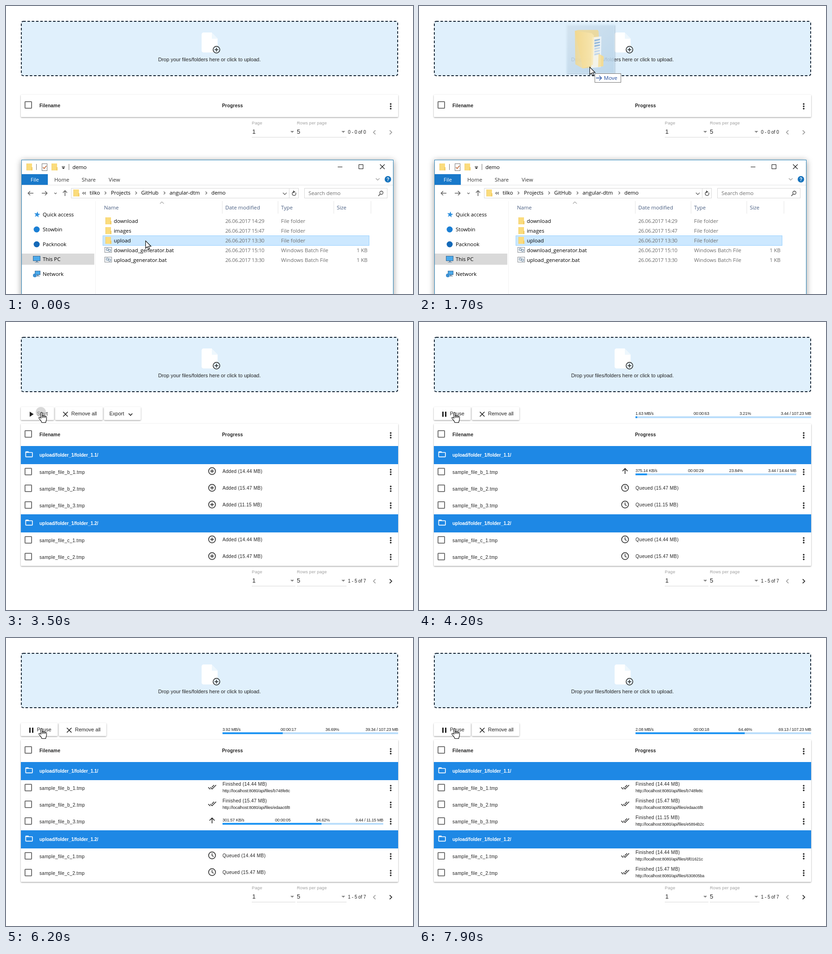
Animation of 876 by 620 pixels, one loop 8 s. Source, as an HTML page with a canvas:

```html
<!DOCTYPE html>
<html lang="en">
<head>
<meta charset="utf-8">
<title>Upload demo</title>
<style>
html, body { margin: 0; width: 100%; height: 100%; overflow: hidden; background: #fff; }
canvas { display: block; }
</style>
</head>
<body>
<canvas id="stage" width="876" height="620"></canvas>
<script>
const c = document.getElementById('stage').getContext('2d');
const LOOP = 8000, STEP = 100, TOTAL = 107.23;
const SANS = '"Liberation Sans", Arial, sans-serif';
const UI = '11.3px "Open Sans", "Noto Sans", sans-serif';
const INK = '#222', BLUE = '#1e88e5';

const FILES = [
  { name: 'sample_file_b_1.tmp', size: 14.44, y: 322, id: 'b748fe8c' },
  { name: 'sample_file_b_2.tmp', size: 15.47, y: 358, id: 'edaac6f8' },
  { name: 'sample_file_b_3.tmp', size: 11.15, y: 394, id: 'e5894b2c' },
  { name: 'sample_file_c_1.tmp', size: 14.44, y: 469, id: '6f01621c' },
  { name: 'sample_file_c_2.tmp', size: 15.47, y: 505, id: '630805ba' }
];
let sum = 0;
for (const f of FILES) { f.start = sum; sum += f.size; }

// [time, value] knots
const ALL_DONE = [[4000, 0], [4900, 15.48], [6200, 39.34], [7900, 69.1252]];
const FILE_DONE = [[4000, 0], [4900, 15.489], [6200, 39.3455], [7900, 70.98]];
const ALL_SPEED = [[4000, 1.4], [4900, 1.85], [6200, 3.92], [7900, 2.08]];
const FILE_SPEED = [[4000, 340], [4900, 392.87], [6200, 301.57], [7900, 410]];

const PAGE = new Path2D('M6 2c-1.1 0-2 .9-2 2v16c0 1.1.9 2 2 2h12c1.1 0 2-.9 2-2V8l-6-6H6z');
const FOLDER = new Path2D('M20 6h-8l-2-2H4c-1.1 0-2 .9-2 2v12c0 1.1.9 2 2 2h16c1.1 0 2-.9 2-2V8c0-1.1-.9-2-2-2zm0 12H4V8h16v10z');
const CHECKS = new Path2D('M18 7l-1.4-1.4-6.35 6.33 1.4 1.4L18 7zm4.24-1.4L11.66 16.17 7.48 12l-1.4 1.4L11.66 19l12-12-1.42-1.4zM.4 13.4L6 19l1.4-1.4L1.83 12 .4 13.4z');
const ARROW = new Path2D('M0 0V16.2L3.7 12.8 6.2 18.6 8.8 17.5 6.3 11.8H11.6Z');
const HAND = new Path2D('M-1.5 1.5C-1.5-.5 1.7-.5 1.7 1.5V8C2 6.6 4.8 6.8 4.8 8.3 5.2 7 7.8 7.3 7.8 9 8.4 8 10.8 8.2 10.8 10V14.5C10.8 18 9 19 9 22H.5C.5 19-2.5 17-5.5 13-6.5 10.5-4 9.8-1.5 12.5Z');
const FINGERS = new Path2D('M1.7 7V11.5M4.8 8V11.5M7.8 9V12');

function at(knots, t, wobble = 0) {
  let i = 1;
  while (i < knots.length - 1 && t > knots[i][0]) i++;
  const [t0, a] = knots[i - 1], [t1, b] = knots[i];
  const u = Math.max(0, Math.min(1, (t - t0) / (t1 - t0)));
  return a + (b - a) * u + wobble * Math.sin(Math.PI * u) * Math.sin(t / 37);
}

function text(s, x, y, font, color = INK, spacing = 0, align = 'left') {
  c.font = font;
  c.fillStyle = color;
  c.letterSpacing = spacing + 'px';
  c.textAlign = align;
  c.fillText(s, x, y);
}
const sans = (s, x, y, px, color, spacing, align) => text(s, x, y, px + 'px ' + SANS, color, spacing, align);
const bold = (s, x, y, color, spacing) => text(s, x, y, 'bold 10px ' + SANS, color, spacing);
const ui = (s, x, y, color = '#000', spacing = 0, align) => text(s, x, y, UI, color, spacing, align);

function box(x, y, w, h, fill, line) {
  if (fill) { c.fillStyle = fill; c.fillRect(x, y, w, h); }
  if (line) { c.strokeStyle = line; c.lineWidth = 1; c.strokeRect(x + .5, y + .5, w - 1, h - 1); }
}

// each run is a flat list of x, y pairs
function lines(color, width, ...runs) {
  c.strokeStyle = color;
  c.lineWidth = width;
  c.beginPath();
  for (const r of runs)
    for (let i = 0; i < r.length; i += 2) c[i ? 'lineTo' : 'moveTo'](r[i], r[i + 1]);
  c.stroke();
}

function poly(fill, ...p) {
  c.fillStyle = fill;
  c.beginPath();
  for (let i = 0; i < p.length; i += 2) c.lineTo(p[i], p[i + 1]);
  c.fill();
}

function disc(x, y, r, fill, line, width = 1.5) {
  c.beginPath();
  c.arc(x, y, r, 0, 7);
  if (fill) { c.fillStyle = fill; c.fill(); }
  if (line) { c.strokeStyle = line; c.lineWidth = width; c.stroke(); }
}

function shape(path, x, y, scale, fill) {
  c.save();
  c.translate(x, y);
  c.scale(scale, scale);
  c.fillStyle = fill;
  c.fill(path);
  c.restore();
}

function raised(x, y, w, h, blur = 3, alpha = .38, dy = 1.3) {
  c.save();
  c.shadowColor = `rgba(0,0,0,${alpha})`;
  c.shadowBlur = blur;
  c.shadowOffsetY = dy;
  c.fillStyle = '#fff';
  c.beginPath();
  c.roundRect(x, y, w, h, 1.5);
  c.fill();
  c.restore();
}

const chevron = (x, y, dx, dy, color, width = 1.5) => dx
  ? lines(color, width, [x - dx, y - dy, x + dx, y, x - dx, y + dy])
  : lines(color, width, [x - 4, y - dy, x, y + dy, x + 4, y - dy]);

function plusIcon(x, y, r, fill) {
  disc(x, y, r, fill, INK);
  lines(INK, 1.5, [x - 4, y, x + 4, y], [x, y - 4, x, y + 4]);
}

function checkbox(y) {
  c.strokeStyle = '#666';
  c.lineWidth = 1.8;
  c.beginPath();
  c.roundRect(40.9, y - 7.1, 14.2, 14.2, 1);
  c.stroke();
}

function dots(y) {
  for (const d of [-5, 0, 5]) disc(828, y + d, 1.8, INK);
}

function dropZone() {
  c.beginPath();
  c.roundRect(33, 33, 810, 117, 4);
  c.fillStyle = '#e0f0fc';
  c.fill();
  c.strokeStyle = '#142333';
  c.lineWidth = 1.9;
  c.setLineDash([5.5, 3.67]);
  c.stroke();
  c.setLineDash([]);
  shape(PAGE, 412.4, 52.7, 2.15, '#fff');
  poly('#eef7fd', 443, 57.5, 456, 70.5, 443, 70.5);
  plusIcon(453, 94, 7.2, '#e9f5fd');
  sans('Drop your files/folders here or click to upload.', 327.5, 119, 11);
}

function meter(x, w, y, speed, left, part, done, size, fill) {
  const label = (s, px, align) => sans(s, px, y, 9, INK, -.2, align);
  const eta = String(Math.floor(left)).padStart(2, '0');
  label(speed, x, 'left');
  label('00:00:' + eta, x + w * .375, 'center');
  label((part * 100).toFixed(2) + '%', x + w * .625, 'center');
  label(`${done.toFixed(2)} / ${size.toFixed(2)} MB`, x + w, 'right');
  box(x, y + 3, w, 4, '#bbdefb');
  box(x, y + 3, w * fill, 4, '#2196f3');
}

function toolbar(t) {
  const running = t >= 3700, shift = running ? 8 : 0;
  raised(32, 183, 71 + shift, 28);
  raised(106 + shift, 183, 102, 28);
  if (running) {
    box(50, 193, 3, 11, INK);
    box(56, 193, 3, 11, INK);
  } else {
    poly(INK, 51, 193, 59.5, 198.5, 51, 204);
    raised(211, 183, 79, 28);
    sans('Export', 222.5, 201, 11);
    chevron(268, 199, 0, 2, INK, 1.7);
  }
  sans(running ? 'Pause' : 'Start', 66.5, 201, 11);
  const x = 128 + shift;
  lines(INK, 1.6, [x - 5, 193.5, x + 5, 203.5], [x - 5, 203.5, x + 5, 193.5]);
  sans('Remove all', x + 12.5, 201, 11);

  if (t === 3500 || t === 3600) {
    c.save();
    c.beginPath();
    c.rect(32, 183, 71, 28);
    c.clip();
    disc(75, 194, t === 3500 ? 11 : 19, 'rgba(190,190,190,.6)');
    c.restore();
  }
  if (t >= 4100) {
    const done = at(ALL_DONE, t), speed = at(ALL_SPEED, t, .5);
    meter(466, 378, 200, speed.toFixed(2) + ' MB/s', (TOTAL - done) / speed,
      done / TOTAL, done, TOTAL, at(ALL_DONE, t - 140) / TOTAL);
  }
}

function fileRow(f, t) {
  const { y, size } = f, iy = y - 1, label = `(${size.toFixed(2)} MB)`;
  const done = at(FILE_DONE, t) - f.start;
  checkbox(y);
  sans(f.name, 72, y + 5, 10, INK, .3);
  dots(y + 1);
  const status = (s, ty) => sans(`${s} ${label}`, 466, ty, 10, INK, .3);
  if (t < 3700) {
    plusIcon(443.5, iy, 7.4);
    status('Added', y + 3);
  } else if (done <= 0) {
    disc(443.5, iy, 7.4, null, INK);
    lines(INK, 1.4, [443.5, iy - 4.5, 443.5, iy + .5, 447, iy + 2.5]);
    status('Queued', y + 3);
  } else if (done < size) {
    lines(INK, 1.6, [443.5, iy + 6, 443.5, iy - 5.5], [438, iy, 443.5, iy - 5.5, 449, iy]);
    const speed = at(FILE_SPEED, t, 90), part = done / size;
    const lagged = (at(FILE_DONE, t - 140) - f.start) / size;
    meter(466, 346, y + 1, speed.toFixed(2) + ' KB/s', (size - done) * 1000 / speed,
      part, done, size, Math.max(lagged, Math.min(part, .066)));
  } else {
    shape(CHECKS, 434.5, iy - 9.3, .77, INK);
    status('Finished', y - 4);
    sans('http://localhost:8080/api/files/' + f.id, 466, y + 10, 9, INK, -.2);
  }
}

function groupRow(y, name) {
  box(32, y, 812, 39, BLUE);
  shape(FOLDER, 40, y + 8.2, .8, '#fff');
  bold(name, 72, y + 23, '#fff', -.03);
}

function table(t, count) {
  const shown = Math.min(5, count), top = count ? 219 : 191;
  const bottom = shown ? FILES[shown - 1].y + 20 : top + 48;
  raised(32, top, 812, bottom - top);
  checkbox(top + 22);
  bold('Filename', 72, top + 27, INK, .2);
  bold('Progress', 465, top + 27, INK, .2);
  dots(top + 25);
  if (shown > 0) groupRow(267, 'upload/folder_1/folder_1.1/');
  if (shown > 3) groupRow(414, 'upload/folder_1/folder_1.2/');
  FILES.slice(0, shown).forEach(f => fileRow(f, t));

  const grey = '#a0a0a0';
  sans('Page', 529, bottom + 16, 9.3, grey, .2);
  sans('Rows per page', 626, bottom + 16, 9.3, grey, .15);
  sans('1', 530, bottom + 36, 13);
  sans('5', 626, bottom + 36, 13);
  for (const x of [616, 726])
    poly('#888', x - 4, bottom + 30, x + 4, bottom + 30, x, bottom + 34);
  box(529, bottom + 43, 94, 1, '#d8d8d8');
  box(626, bottom + 43, 107, 1, '#d8d8d8');
  sans(`${count ? 1 : 0} - ${shown} of ${count}`, 736, bottom + 36, 10, INK, -.07);
  chevron(793, bottom + 33, -2.2, 4.4, '#999');
  chevron(828, bottom + 33, 2.2, 4.4, count > 5 ? INK : '#999', 1.7);
}

function folderIcon(x, y) {
  box(x, y, 12, 15, '#fbdc7d');
  box(x, y, 1, 15, '#f1cd68');
  box(x + 10, y + 8, 3, 7, '#f3cf6b');
}

function batIcon(y) {
  box(212, y - 6, 16, 12, '#f4f6f8', '#8d9297');
  disc(218, y - 1, 2.4, null, '#7a94ab', 1.2);
  disc(223, y + 1, 2.4, null, '#7a94ab', 1.2);
}

function monitor(x, y, w, h) {
  box(x, y, w, h, '#4ba9ea', '#3c6c96');
  box(x + w / 2 - 1, y + h, 3, 2, '#6c8aa5');
  box(x + w / 2 - 4, y + h + 2, 9, 1, '#6c8aa5');
}

function titleBar() {
  folderIcon(44, 339);
  box(65, 340, 1, 13, '#777');
  box(77, 339, 12, 16, '#fff', '#777');
  lines('#c06a3a', 1.7, [79.5, 347, 82, 350, 87, 344]);
  folderIcon(98, 339);
  box(120, 345, 7, 1, '#222');
  poly('#222', 120, 347.5, 127, 347.5, 123.5, 351);
  box(135, 340, 1, 13, '#777');
  ui('demo', 143, 351);
  box(714, 346, 10, 1, '#111');
  box(759, 341, 10, 10, null, '#111');
  lines('#111', 1.1, [805, 341, 815, 351], [805, 351, 815, 341]);

  box(34, 362, 56, 23, '#1979ca');
  ui('File', 62, 378, '#fff', 0, 'center');
  ui('Home', 104, 378, '#333');
  ui('Share', 163, 378, '#333');
  ui('View', 221, 378, '#333');
  box(34, 385, 799, 1, '#e2e3e4');
  chevron(800, 373, 0, 2, '#999', 1.2);
  disc(822, 373, 7, '#1673bd');
  text('?', 822, 377, 'bold 10px ' + SANS, '#fff', 0, 'center');
}

function addressBar() {
  const g = '#666';
  lines(g, 1.6, [59, 403, 48, 403], [52, 398.5, 47.5, 403, 52, 407.5]);
  lines(g, 1.6, [77, 403, 88, 403], [84, 398.5, 88.5, 403, 84, 407.5]);
  lines(g, 1.2, [104, 402, 106.5, 404.5, 109, 402]);
  lines(g, 1.6, [127, 409, 127, 398], [122.5, 402, 127, 397.5, 131.5, 402]);
  box(140, 392, 490, 22, '#fff', '#d9d9d9');
  box(609, 392, 1, 22, '#d9d9d9');
  folderIcon(145, 395);
  lines('#333', 1.1, [167.5, 400.5, 165, 403, 167.5, 405.5], [171.5, 400.5, 169, 403, 171.5, 405.5]);
  ui('tilko', 180, 406);
  ui('Projects', 226, 406);
  ui('GitHub', 291, 406);
  ui('angular-dtm', 352, 406);
  ui('demo', 442, 406);
  for (const x of [214, 280, 341, 431]) lines('#555', 1.1, [x - 1.5, 399.5, x + 1.5, 402.5, x - 1.5, 405.5]);
  chevron(600, 404, 0, 2, '#666', 1.4);
  c.beginPath();
  c.arc(620, 404, 4, -.6, 4.4);
  c.strokeStyle = '#555';
  c.lineWidth = 1.4;
  c.stroke();
  poly('#555', 618, 397, 623, 400, 618, 403);
  box(642, 392, 179, 22, '#fff', '#d9d9d9');
  ui('Search demo', 651, 407, '#6d6d6d');
  disc(808, 402, 3.5, null, '#444', 1.3);
  lines('#444', 1.5, [805.5, 404.5, 801.5, 409]);
}

function sidebar() {
  box(34, 533, 156, 24, '#d9d9d9');
  box(192, 420, 1, 200, '#f1f1f1');
  const star = [];
  for (let i = 0; i < 10; i++) {
    const r = i % 2 ? 2.9 : 6.8, a = i * Math.PI / 5 - 1.4;
    star.push(67 + r * Math.cos(a), 449 + r * Math.sin(a));
  }
  poly('#2f90de', ...star);
  disc(66, 481, 6.5, '#1b7fd4');
  disc(66, 513, 6.5, '#1469b8');
  monitor(58, 538, 16, 11);
  monitor(62, 570, 12, 9);
  disc(62, 580, 4, '#3d8fd1');
  ['Quick access', 'Stowbin', 'Packnook', 'This PC', 'Network']
    .forEach((s, i) => ui(s, 79, 453 + 32 * i));
}

function explorer() {
  raised(33, 331, 801, 300, 14, .4, 2);
  box(33, 331, 801, 300, '#fff', '#2983b8');
  titleBar();
  addressBar();
  sidebar();
  const head = '#4a5f82', dim = '#6d6d6d';
  [['Name', 211], ['Date modified', 472], ['Type', 592], ['Size', 712]].forEach(([s, x]) => ui(s, x, 438, head));
  for (const x of [465, 585, 705, 785]) box(x, 420, 1, 27, '#e5e5e5');
  lines('#666', 1, [331.5, 425.5, 335.5, 421.5, 339.5, 425.5]);
  box(208, 494, 574, 22, '#cce8ff', '#99d1ff');
  [['download', '14:29'], ['images', '15:47'], ['upload', '13:30'],
   ['download_generator.bat', '15:10'], ['upload_generator.bat', '13:30']].forEach(([name, time], i) => {
    const y = 467 + 21 * i, bat = i > 2;
    if (bat) batIcon(y - 5); else folderIcon(214, y - 12);
    ui(name, 232, y);
    ui('26.06.2017 ' + time, 472, y, dim, -.35);
    ui(bat ? 'Windows Batch File' : 'File folder', 592, y, dim);
    if (bat) ui('1 KB', 778, y, dim, -.1, 'right');
  });
}

function ghost(x, y, alpha) {
  c.save();
  c.translate(x - 51, y - 92);
  c.globalAlpha = alpha;
  c.shadowColor = 'rgba(0,40,80,.4)';
  c.shadowBlur = 3;
  c.shadowOffsetX = c.shadowOffsetY = 1;
  const g = c.createLinearGradient(0, 0, 104, 105);
  g.addColorStop(0, '#e2f0fa');
  g.addColorStop(1, '#c6e1f5');
  box(0, 0, 104, 105, g);
  c.shadowColor = 'transparent';
  box(0, 0, 104, 105, null, '#d8eaf7');
  // back cover, sheets, tab, front cover
  poly('#f3d98f', 19, 14, 26, 12, 68, 12, 70, 15, 72, 64, 81, 70, 80, 90, 36, 95);
  poly('#f7fafc', 56, 28, 76, 26, 75, 92, 54, 94);
  for (let i = 0; i < 6; i++) poly(i < 3 ? '#7fabd8' : '#b5d0ea', 61, 33 + i * 6, 73, 31 + i * 6, 73, 34 + i * 6, 61, 37 + i * 6);
  poly('#f4dc93', 70, 63, 81, 69, 80, 90, 69, 92);
  const front = c.createLinearGradient(19, 0, 60, 0);
  front.addColorStop(0, '#f3d78a');
  front.addColorStop(1, '#fae9b4');
  poly(front, 19, 14, 55, 19, 60, 24, 58, 87, 36, 95, 20, 86);
  c.restore();
}

function moveTip(x, y) {
  box(x + 11, y + 14, 57, 20, '#fff', '#777');
  lines('#2a55a5', 1.3, [x + 14, y + 24, x + 26, y + 24], [x + 21, y + 19, x + 26, y + 24, x + 21, y + 29]);
  ui('Move', x + 31, y + 28, '#1f4a9c');
}

function pointer(x, y, hand) {
  c.save();
  c.translate(x, y);
  c.fillStyle = '#fff';
  c.strokeStyle = '#000';
  c.lineWidth = 1.1;
  c.fill(hand ? HAND : ARROW);
  c.stroke(hand ? HAND : ARROW);
  if (hand) c.stroke(FINGERS);
  c.restore();
}

const ease = u => u * u * (3 - 2 * u);
const ramp = (t, from, to) => Math.max(0, Math.min(1, (t - from) / (to - from)));

function cursor(t) {
  if (t >= 1900) {
    const u = ease(ramp(t, 2700, 3300));
    pointer(368.5 - 292 * u, 128.5 + 66 * u, true);
    return;
  }
  const u = ease(ramp(t, 1100, 1700));
  const x = 300.5 + 67 * u, y = 505.5 - 374 * u;
  if (t >= 1200) {
    ghost(x, y, t < 1800 ? .8 : .4);
    if (y < 325) moveTip(Math.round(x - .5), Math.round(y - .5));
  }
  pointer(x, y, false);
}

function draw(t) {
  c.fillStyle = '#fff';
  c.fillRect(0, 0, 876, 620);
  const count = t < 2100 ? 0 : Math.min(7, 2 + (t - 2100) / 50);
  dropZone();
  if (count) toolbar(t);
  table(t, count);
  if (!count) explorer();
  cursor(t);
}

function tick() {
  draw(Math.floor(performance.now() % LOOP / STEP) * STEP);
  requestAnimationFrame(tick);
}
tick();
</script>
</body>
</html>
```
